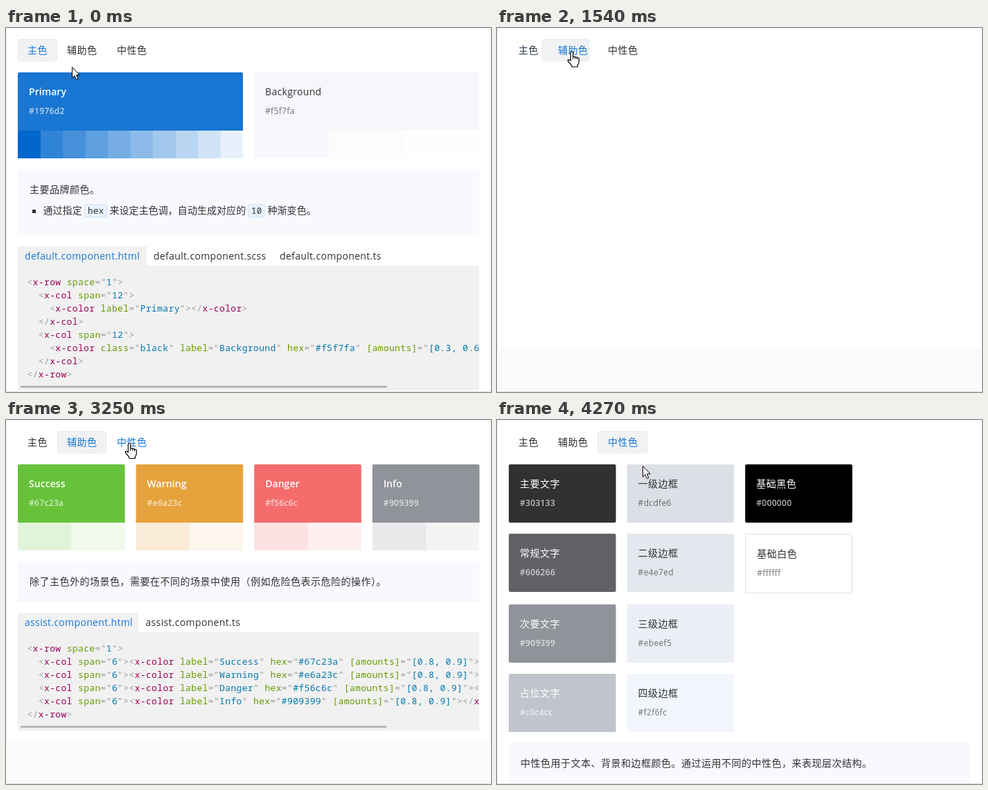
Write an HTML page that moves like this. It is 700 by 525 pixels and loops after 4350 ms.

```html
<!DOCTYPE html>
<html lang="zh-CN">
<head>
<meta charset="utf-8">
<title>Colors</title>
<style>
html, body { margin: 0; width: 100%; height: 100%; overflow: hidden; background: #fff; }
svg { display: block; width: 100%; height: 100%; }
text { font-family: "Open Sans", "Noto Sans CJK SC", "Noto Sans CJK", sans-serif; }
.code { font-family: "Noto Sans Mono", "DejaVu Sans Mono", monospace; }
</style>
</head>
<body>
<svg id="stage" viewBox="0 0 700 525" preserveAspectRatio="none">
  <defs>
    <clipPath id="codeClip"><rect x="17" y="0" width="666" height="525"/></clipPath>
  </defs>
</svg>
<script>
const stage = document.getElementById('stage');
const BLUE = '#1976d2', INK = '#303133';

function el(parent, tag, attrs, content) {
  const node = document.createElementNS('http://www.w3.org/2000/svg', tag);
  for (const key in attrs) node.setAttribute(key, attrs[key]);
  if (content !== undefined) node.textContent = content;
  parent.appendChild(node);
  return node;
}
const group = (parent, attrs) => el(parent, 'g', attrs || {});
const rect = (parent, x, y, width, height, fill, more) =>
  el(parent, 'rect', { x, y, width, height, fill, ...more });
const isHan = s => /[\u4e00-\u9fff]/.test(s);
const text = (parent, x, y, s, fill = INK, more) =>
  el(parent, 'text', { x, y, fill, 'font-size': 14, 'letter-spacing': isHan(s) ? 0.5 : 0.33, ...more }, s);

const channels = hex => [1, 3, 5].map(i => parseInt(hex.slice(i, i + 2), 16));
function blend(from, to, k) {
  const a = channels(from), b = channels(to);
  return `rgb(${a.map((v, i) => Math.round(v + (b[i] - v) * k))})`;
}
const tint = (hex, k) => blend(hex, '#ffffff', k);

function card(parent, x, y, width, label, hex, light, shades = []) {
  const framed = hex === '#ffffff', pad = framed ? 17 : 16;
  if (framed) rect(parent, x + 0.5, y + 0.5, width - 1, 85, hex, { stroke: '#dcdfe6', rx: 1.5 });
  else rect(parent, x, y, width, 84, hex, { rx: 2 });
  if (shades.length) rect(parent, x, y + 80, width, 4, hex);
  const w = width / shades.length;
  shades.forEach((fill, i) =>
    rect(parent, x + i * w, y + 84, w, 40, fill, { 'shape-rendering': 'crispEdges' }));
  const ink = light ? '#ffffff' : INK;
  const top = y + pad - 16;
  const bold = light ? { 'font-weight': isHan(label) ? 500 : 600 } : {};
  if (light && !isHan(label)) bold['letter-spacing'] = 0.05;
  text(parent, x + pad, top + 33, label, ink, bold);
  text(parent, x + pad, top + 60, hex, ink,
    { 'font-size': 12, opacity: light ? 0.7 : 0.68, 'font-weight': light ? 600 : 400 });
}

function note(parent, y, height, s) {
  rect(parent, 17.5, y + 0.5, 665, height - 1, '#f7f9fd', { stroke: '#f4f6fb', rx: 1.5 });
  text(parent, 34, y + 34, s);
}

function chip(parent, x, width, s) {
  rect(parent, x + 0.5, 254.5, width - 1, 18, '#e8f2fb', { stroke: '#d3e5f6', rx: 2 });
  text(parent, x + 5, 268, s, INK, { class: 'code', 'font-size': 12.5 });
}

// Splits a line of markup into coloured runs.
function markup(parent, y, line) {
  const pitch = 8.16, indent = line.search(/\S/);
  const node = el(parent, 'text', {
    x: 30.5 + indent * pitch, y, class: 'code', 'font-size': 13, 'letter-spacing': 0.36
  });
  const run = (fill, s) => s && el(node, 'tspan', { fill }, s);
  const parts = /(<\/?)([\w-]+)|( )(\[?\w+\]?)(=")([^"]*)(")|(>)/g;
  for (const m of line.trim().matchAll(parts)) {
    run('#999', m[1]); run('#905', m[2]);
    run('#999', m[3]); run('#690', m[4]); run('#999', m[5]);
    run('#07a', m[6]); run('#999', m[7]); run('#999', m[8]);
  }
}

function source(parent, y, files, lines, thumb) {
  rect(parent, 17, y, files[0][2], 30, '#f1f1f1', { rx: 2 });
  files.forEach(([name, x], i) => text(parent, x, y + 19, name, i ? INK : BLUE));
  const height = 28 + lines.length * 19;
  rect(parent, 17, y + 28, 666, height, '#f1f1f1', { rx: 1 });
  const body = group(parent, { 'clip-path': 'url(#codeClip)' });
  lines.forEach((line, i) => markup(body, y + 56 + i * 19, line));
  rect(parent, 21, y + height + 21, thumb, 3, '#b8b8b8');
}

// Page frame
rect(stage, 0, 0, 700, 525, '#fff');
const shortPage = group(stage);
rect(shortPage, 0, 464, 700, 61, '#fafafa');
rect(shortPage, 0, 464, 700, 1, '#eef0f7');
const sides = [0, 699].map(x => rect(stage, x, 0, 1, 525, '#eff1f8'));

const panels = [0, 1, 2].map(() => group(stage));

// Main colours
const mainShades = ['#0067cf'];
for (let i = 1; i < 10; i++) mainShades.push(tint(BLUE, i / 10));
card(panels[0], 17, 64, 325, 'Primary', BLUE, true, mainShades);
card(panels[0], 358, 64, 325, 'Background', '#f5f7fa', false, [0.3, 0.6, 0.9].map(k => tint('#f5f7fa', k)));
note(panels[0], 204, 95, '主要品牌颜色。');
const tight = { 'letter-spacing': 0.05 };
rect(panels[0], 38, 262, 5, 5, INK);
text(panels[0], 53.5, 268, '通过指定', INK, tight);
chip(panels[0], 113, 33, 'hex');
text(panels[0], 149.5, 268, '来设定主色调，自动生成对应的', INK, tight);
chip(panels[0], 349, 25, '10');
text(panels[0], 377.5, 268, '种渐变色。', INK, tight);
source(panels[0], 315,
  [['default.component.html', 27, 186], ['default.component.scss', 213], ['default.component.ts', 395]],
  [
    '<x-row space="1">',
    '  <x-col span="12">',
    '    <x-color label="Primary"></x-color>',
    '  </x-col>',
    '  <x-col span="12">',
    '    <x-color class="black" label="Background" hex="#f5f7fa" [amounts]="[0.3, 0.6, 0.9]"></x-color>',
    '  </x-col>',
    '</x-row>'
  ], 529);

// Assist colours
const assist = [['Success', '#67c23a'], ['Warning', '#e6a23c'], ['Danger', '#f56c6c'], ['Info', '#909399']];
assist.forEach(([label, hex], i) =>
  card(panels[1], 17 + i * 170.6, 64, 154.6, label, hex, true, [tint(hex, 0.8), tint(hex, 0.9)]));
note(panels[1], 204, 58, '除了主色外的场景色，需要在不同的场景中使用（例如危险色表示危险的操作）。');
source(panels[1], 278,
  [['assist.component.html', 27, 174], ['assist.component.ts', 201.5]],
  [
    '<x-row space="1">',
    ...assist.map(([label, hex]) =>
      `  <x-col span="6"><x-color label="${label}" hex="${hex}" [amounts]="[0.8, 0.9]"></x-color></x-col>`),
    '</x-row>'
  ], 528);

// Neutral colours
const rows = [64, 164, 266, 366];
[
  [['主要文字', '#303133'], ['常规文字', '#606266'], ['次要文字', '#909399'], ['占位文字', '#c0c4cc']],
  [['一级边框', '#dcdfe6'], ['二级边框', '#e4e7ed'], ['三级边框', '#ebeef5'], ['四级边框', '#f2f6fc']],
  [['基础黑色', '#000000'], ['基础白色', '#ffffff']]
].forEach((column, c) => column.forEach(([label, hex], r) =>
  card(panels[2], 17 + c * 170.6, rows[r], 154.6, label, hex, c === 0 || hex === '#000000')));
note(panels[2], 466, 70, '中性色用于文本、背景和边框颜色。通过运用不同的中性色，来表现层次结构。');

// Tabs
const marker = rect(stage, 17.5, 16.5, 56, 31, '#f1f2f3', { stroke: '#e7e9ec', rx: 2 });
const tabs = [['主色', 31], ['辅助色', 88], ['中性色', 160]].map(([s, x]) => text(stage, x, 37, s));
rect(stage, 0, 524, 700, 1, '#dedede');

// Pointers, both with the hot spot at 0,0
const look = { fill: '#fff', stroke: '#000', 'stroke-width': 1, 'stroke-linejoin': 'round' };
const arrow = el(stage, 'path', {
  d: 'M.5 .5V16L4 12.7L6.6 18.6L9 17.6L6.5 11.8H11.3Z', ...look
});
const hand = group(stage);
el(hand, 'path', {
  d: 'M-1.7 13V2.2a1.7 1.7 0 0 1 3.4 0V8q1.6-1 3 .6q1.7-.8 2.8.8q2.8-.6 2.8 1.8V15q0 3-2 5V22.5H.5' +
     'Q-1 19-5.3 14.5q-1-1.7.5-2.4q1.5-.3 3.1 1.6Z', ...look, 'stroke-width': 1.2
});
el(hand, 'path', { d: 'M1.7 8V11.5M4.7 8.6V11.5M7.5 9.6V12', fill: 'none', stroke: '#000' });

// Timeline
const LOOP = 4350;
const ticks = [0, 630, 710, 780, 840, 1160, 1240, 1310, 1390, 1470, 1540, 1620, 1700, 1770, 1850, 1930,
  2000, 2080, 3250, 3330, 3410, 3500, 3570, 3650, 3730, 4050, 4120, 4200, 4270];
const pointer = [ // time, x, y, hand
  [0, 95, 56, 0], [630, 97, 52, 0], [710, 101, 43, 1], [780, 105, 36, 1], [840, 107, 33.5, 1],
  [1470, 108, 33.5, 1], [1850, 121, 34, 1], [1930, 146, 34, 1], [2000, 170, 33.5, 1], [2080, 178, 33, 1],
  [4050, 183, 37, 1], [4120, 195, 49, 0], [4200, 206, 61, 0], [4270, 210, 66, 0]
];
const slides = [1430, 3369];
const markerBox = [[17, 57], [74, 71], [145, 72]];
const clamp = v => Math.min(1, Math.max(0, v));
const lastAt = (list, t, at) => list.filter(v => at(v) <= t).pop();

// CSS "ease"
function ease(x) {
  if (x <= 0 || x >= 1) return clamp(x);
  let lo = 0, hi = 1, t = 0.5;
  for (let i = 0; i < 24; i++) {
    t = (lo + hi) / 2;
    if (0.75 * t * (1 - t) + t * t * t < x) lo = t; else hi = t;
  }
  const u = 1 - t;
  return 0.3 * u * u * t + 3 * u * t * t + t * t * t;
}
const move = (t, start, length) => ease((t - start) / length);

function draw(time) {
  const t = lastAt(ticks, time, v => v);
  const active = slides.filter(s => s <= t).length;
  const p = active ? move(t, slides[active - 1], 295) : 1;
  panels.forEach((panel, i) => panel.setAttribute('display', i === active ? 'inline' : 'none'));
  panels[active].setAttribute('transform', `translate(${2000 * (1 - p)} 0)`);
  panels[active].setAttribute('opacity', clamp(1 - 1.27 * (1 - p)));
  shortPage.setAttribute('display', active === 1 ? 'inline' : 'none');
  sides.forEach(side => side.setAttribute('height', active === 1 ? 464 : 525));

  const m = slides.map(s => move(t, s - 24, 250));
  const [x, w] = [0, 1].map(k =>
    markerBox[0][k] + m.reduce((sum, v, i) => sum + v * (markerBox[i + 1][k] - markerBox[i][k]), 0));
  marker.setAttribute('x', x + 0.5);
  marker.setAttribute('width', w - 1);

  const glow = [
    1 - move(t, 1406, 250),
    move(t, 650, 150) * (1 - move(t, 3345, 250)),
    move(t, 1900, 150)
  ];
  tabs.forEach((tab, i) => tab.setAttribute('fill', blend(INK, BLUE, glow[i])));

  const [, px, py, pointing] = lastAt(pointer, t, v => v[0]);
  arrow.setAttribute('display', pointing ? 'none' : 'inline');
  hand.setAttribute('display', pointing ? 'inline' : 'none');
  (pointing ? hand : arrow).setAttribute('transform', `translate(${px} ${py})`);
}

const begin = performance.now();
function loop() {
  draw((performance.now() - begin) % LOOP);
  requestAnimationFrame(loop);
}
loop();
</script>
</body>
</html>
```
